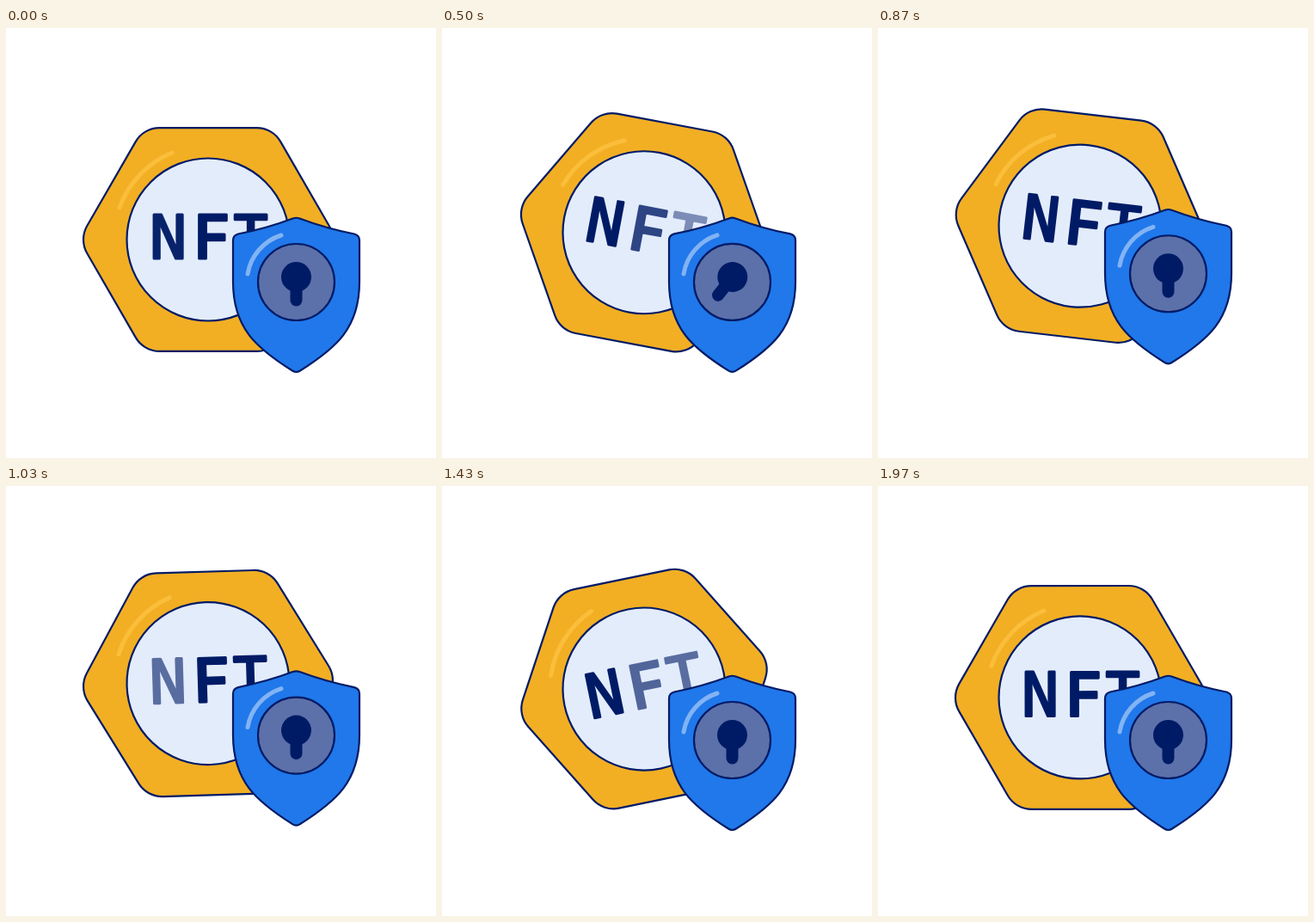
Animation of 500 by 500 pixels, one loop 2000 ms. Source, as an HTML page:

```html
<!DOCTYPE html>
<html lang="en">
<head>
<meta charset="utf-8">
<title>NFT shield</title>
<style>
  html, body { margin: 0; width: 100%; height: 100%; overflow: hidden; background: #fff; }
  svg { display: block; width: 100vw; height: 100vh; }
  .line { stroke: #001b66; stroke-width: 2.2; }
  .arc { fill: none; stroke-width: 5; stroke-linecap: round; }
  text {
    font: 400 72px "Noto Sans Mono", monospace;
    text-anchor: middle;
    fill: #001b66; stroke: #001b66; stroke-width: 3; stroke-linejoin: round;
  }
  .wide { font: 500 70px Inter, sans-serif; }
</style>
</head>
<body>
<svg viewBox="0 0 500 500">
  <defs>
    <path id="hex" stroke-linejoin="round" d="M-113 0L-56.5-97.9H56.5L113 0L56.5 97.9H-56.5Z"/>
  </defs>
  <g id="coin">
    <use href="#hex" fill="#001b66" stroke="#001b66" stroke-width="66.2"/>
    <use href="#hex" fill="#f2af24" stroke="#f2af24" stroke-width="61.8"/>
    <path class="arc" stroke="#fbbe3b" d="M-103-37A109 109 0 0 1-42-101"/>
    <circle class="line" r="94.5" fill="#e3ecfb"/>
    <text x="-46.5" y="21.5">N</text>
    <text x="4.5" y="21.5" class="wide">F</text>
    <text x="49.5" y="21.5">T</text>
  </g>
  <g id="shield">
    <path class="line" fill="#2078ea" d="M333.5 221.5Q337.5 220 341.5 221.5Q372 233 405 239.5Q411 241 411 247V295C411 349 384 372 342 398.5Q337.5 401.5 333 398.5C291 372 264 349 264 295V247Q264 241 270 239.5Q303 233 333.5 221.5Z"/>
    <path class="arc" stroke="#82b3f4" d="M281 286A57 57 0 0 1 320 241"/>
    <circle class="line" cx="337.5" cy="295.5" r="44.5" fill="#5c70aa"/>
    <g id="key">
      <circle cx="337.5" cy="289.5" r="17.5" fill="#001b66"/>
      <path d="M337.5 290V316.5" stroke="#001b66" stroke-width="14" stroke-linecap="round"/>
    </g>
  </g>
</svg>
<script>
  const LOOP = 2000, FPS = 30;
  const [coin, shield, key] = ["coin", "shield", "key"].map(id => document.getElementById(id));
  const letters = document.querySelectorAll("text");

  // Eased progress from 0 to 1 between times a and b
  const ease = (t, a, b) => {
    const p = Math.min(1, Math.max(0, (t - a) / (b - a)));
    return (1 - Math.cos(Math.PI * p)) / 2;
  };
  // Rises from a to b, falls back from b to c
  const bump = (t, a, b, c) => ease(t, a, b) - ease(t, b, c);

  function draw(t) {
    const y = 237.75 + 8.25 * Math.cos(2 * Math.PI * t / LOOP);
    const tilt = 12 * (ease(t, 0, 640) - 2 * ease(t, 640, 1360) + ease(t, 1360, LOOP));
    coin.setAttribute("transform", `translate(235 ${y}) rotate(${tilt})`);

    shield.setAttribute("transform", `translate(0 ${-10 * bump(t, 480, 820, 1270)})`);
    key.setAttribute("transform", `rotate(${45 * bump(t, 0, 400, 800)} 337.5 290)`);

    // Two waves of fading run through the letters
    letters.forEach((letter, i) => {
      const dip = start => bump(t, start, start + 200, start + 400);
      const s = i * 200 - 30;
      letter.setAttribute("opacity", 1 - 0.75 * (dip(s) + dip(s + 960)));
    });
  }

  function tick() {
    const t = performance.now() % LOOP;
    draw(Math.floor((t + 3.4) * FPS / 1000) * 1000 / FPS % LOOP);
    requestAnimationFrame(tick);
  }
  tick();
</script>
</body>
</html>
```
